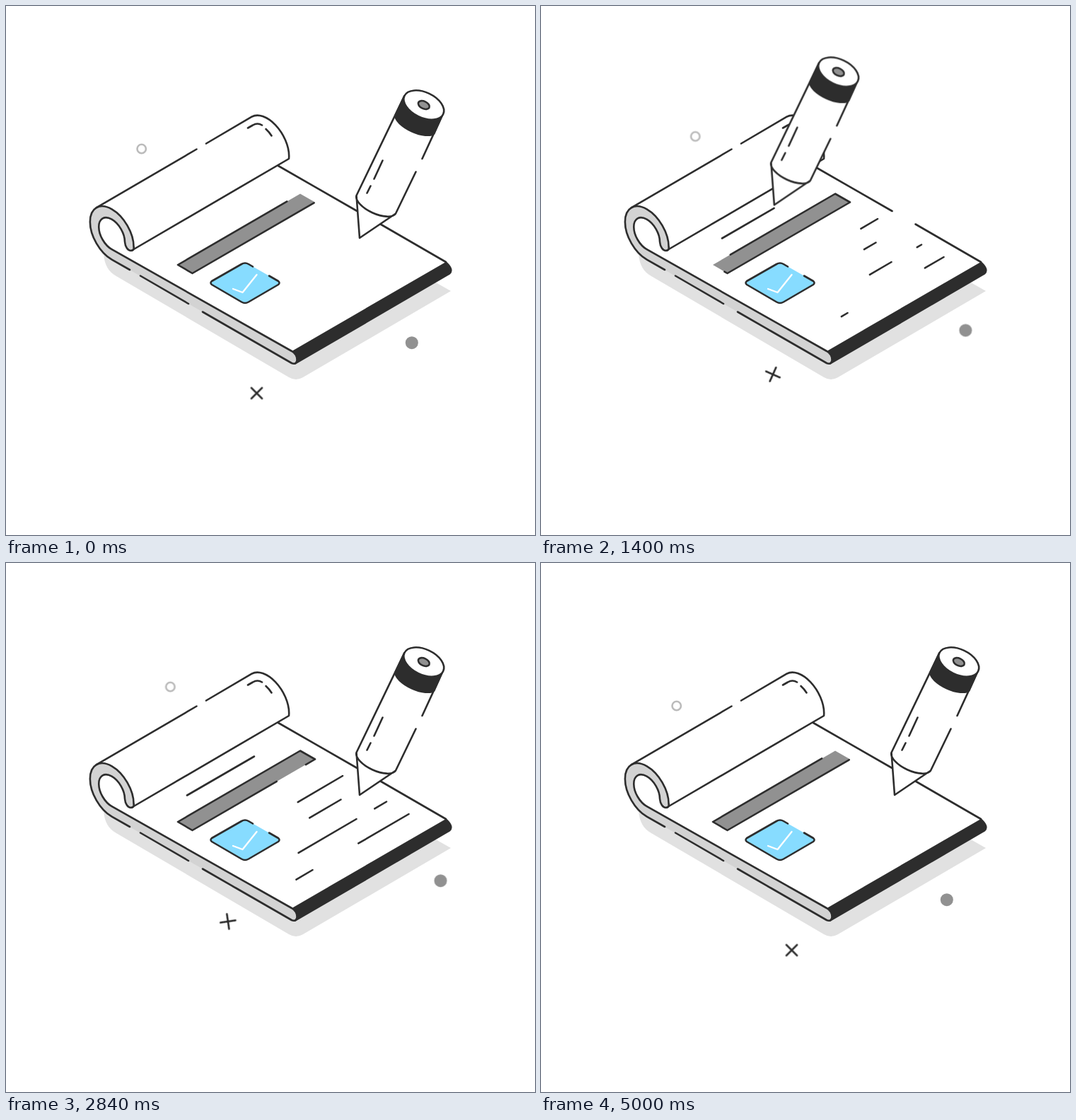
Write an HTML page without scripts that moves like this. It is 748 by 748 pixels and loops after 5040 ms.

```html
<!DOCTYPE html>
<html lang="en">
<head>
<meta charset="utf-8">
<title>Notepad and pencil</title>
<style>
  :root { --ink: #2d2d2d; --mid: #919191; --smooth: cubic-bezier(.333, 0, .667, 1); }
  html, body { margin: 0; width: 100%; height: 100%; overflow: hidden; background: #fff; }
  svg { display: block; width: 100vw; height: 100vh; }

  .line { fill: none; stroke: var(--ink); stroke-width: 2.6; stroke-linecap: round; stroke-linejoin: round; }
  .paper { fill: #fff; }
  .mid { fill: var(--mid); }
  .edge { fill: #d3d3d3; }
  .ink { fill: var(--ink); }

  .drift, .spin, .trim, .written, .gap, .px, .py { animation: 5040ms infinite var(--smooth); }

  /* floating marks */
  .drift { animation-name: drift; }
  .spin { animation-name: spin; }
  @keyframes drift {
    0%, 99.206%, 100% { transform: none; }
    48.413% { transform: translate(var(--dx), var(--dy)); }
  }
  @keyframes spin {
    0% { transform: rotate(0deg); }
    99.206%, 100% { transform: rotate(360deg); }
  }

  /* text lines: drawn and wiped three times */
  .trim, .written { stroke-dasharray: 100 101; }
  .trim { animation-name: trim; }
  @keyframes trim {
    0% { stroke-dashoffset: 100.5; }
    16.534% { stroke-dashoffset: 0; }
    33.069% { stroke-dashoffset: -100.5; }
    49.603% { stroke-dashoffset: -201; }
    66.138% { stroke-dashoffset: -301.5; }
    82.672% { stroke-dashoffset: -402; }
    99.206%, 100% { stroke-dashoffset: -502.5; }
  }

  /* the line under the pencil */
  .written { animation-name: written; animation-timing-function: linear; }
  @keyframes written {
    0%, 12.4% { stroke-dashoffset: 100.5; }
    32.242%, 79.365% { stroke-dashoffset: 0; }
    99.206%, 100% { stroke-dashoffset: -100.5; }
  }

  /* gap running twice around the bar */
  .gap { stroke-dasharray: 400.5 47.5; animation-name: gap; animation-timing-function: linear; }
  @keyframes gap {
    0% { stroke-dashoffset: 222.5; }
    99.206%, 100% { stroke-dashoffset: -673.5; }
  }

  /* pencil: hop left, write, hop back */
  .px { animation-name: px; }
  .py { animation-name: py; }
  @keyframes px {
    0% { transform: none; animation-timing-function: cubic-bezier(.45, 0, .45, 1); }
    12.4% { transform: translateX(-242px); animation-timing-function: linear; }
    32.242% { transform: translateX(-149.5px); animation-timing-function: cubic-bezier(.4, 0, .38, 1); }
    49.603%, 100% { transform: none; }
  }
  @keyframes py {
    0% { transform: none; }
    6.2% { transform: translateY(-106px); }
    12.4% { transform: translateY(-6px); animation-timing-function: linear; }
    32.242% { transform: translateY(-58.5px); }
    37.698% { transform: translateY(-106px); }
    49.603%, 100% { transform: none; }
  }
</style>
</head>
<body>
<svg viewBox="0 0 748 748">
  <!-- shadow and page -->
  <path fill="#e1e1e1" d="M138 350C139 366 145 376 156 382L400 525Q410 531 420 525L629 403L606 390L400 480Z"/>
  <path class="paper" d="M160 350L385 226L622 362L404 488Z"/>
  <path class="line" d="M385 226L496.500 290M529.500 308.500L622 362"/>
  <path class="line" style="fill:var(--ink)" d="M405 489L622.500 363C628 368 632 374 627 378.500L409 505.500Q413 497 405 489Z"/>

  <!-- curled sheet edge -->
  <path class="edge" d="M404 505L149.700 358.700A43.700 25.200 60 1 1 180.600 340.900C181 344 180 346 177 346C172 346 168.500 340 168 333.500A26 15 60 1 0 149.700 344.200L404 488C414 494 414 509 404 505Z"/>
  <path class="line" d="M175 373L149.700 358.700A43.700 25.200 60 1 1 180.600 340.900C181 344 180 346 177 346C172 346 168.500 340 168 333.500A26 15 60 1 0 149.700 344.200L404 488C414 494 414 509 404 505L278 432.500M190 381.500L258 421"/>

  <!-- roll -->
  <path class="line" d="M127.900 285.200L269.500 202.500M283 194.500L347.400 156.700A43.700 25.200 60 0 1 400.200 212.400L400 216L178 345.500M342 172.500L349 168.500C353 166 358 166 362 168.500M367.500 174Q372 178 375.500 183.500"/>

  <!-- bar -->
  <path class="mid" d="M243 366L416 265.500L437 277.500L263.500 378Z"/>
  <path class="line gap" pathLength="448" d="M243 366L416 265.500L437 277.500L263.500 378Z"/>

  <!-- checkbox -->
  <path fill="#87dcff" d="M291 389L333 365Q338 362 343 365L385 389Q388 391.500 385 394L343 418.500Q338 421.500 333 418.500L291 394Q288 391.500 291 389Z"/>
  <path class="line" d="M372 381.500L385 389Q388 391.500 385 394L343 418.500Q338 421.500 333 418.500L291 394Q288 391.500 291 389L333 365Q338 362 343 365L349 368.500"/>
  <path class="line" style="stroke:#fff;stroke-width:2.300" d="M321 400L334.500 405L354.500 380"/>

  <!-- text lines -->
  <g class="line">
    <path class="written" pathLength="100" d="M256 328.500L351 273.500"/>
    <path class="trim" pathLength="100" d="M376 359.500L476 301"/>
    <path class="trim" pathLength="100" d="M403.500 375.500L473.500 334.500"/>
    <path class="trim" pathLength="100" d="M366 437.500L495.500 362"/>
    <path class="trim" pathLength="100" d="M511.500 353L538 337.500"/>
    <path class="trim" pathLength="100" d="M457 420.500L569.500 355"/>
    <path class="trim" pathLength="100" d="M397 455.500L433.500 434"/>
  </g>

  <!-- floating marks -->
  <g class="drift" style="--dx:43.500px;--dy:-28.800px">
    <circle cx="191.700" cy="202" r="6.200" fill="none" stroke="#bbb" stroke-width="2.600"/>
    <circle class="mid" cx="573.800" cy="476.200" r="9"/>
  </g>
  <g class="drift" style="--dx:-43.500px;--dy:-43.500px">
    <g transform="translate(354.500 547.500)">
      <path class="line spin" d="M-7.500 -7.500L7.500 7.500M7.500 -7.500L-7.500 7.500"/>
    </g>
  </g>

  <!-- pencil -->
  <g class="px"><g class="py">
    <path class="paper" d="M563.400 127.100L495.500 268L500 328L551 293.500L617.600 152.900Z"/>
    <path class="paper" d="M495.500 268A30.600 13.500 24.700 0 0 551 293.500Z"/>
    <path class="line" d="M563.400 127.100L495.500 268A30.600 13.500 24.700 0 0 551 293.500L579.500 234.500M588.500 216L617.600 152.900M495.500 268L500 328L551 293.500M532.500 218.500L520.500 244.500M515.500 254.500L510.500 264.500"/>
    <path class="line" style="fill:var(--ink)" d="M563.400 127.100L550.500 154.500A30.600 12.500 24.700 0 0 605.500 180L617.600 152.900Z"/>
    <g transform="translate(590.800 140) rotate(25.400)">
      <ellipse class="line" style="fill:#fff" rx="30.300" ry="17.800"/>
      <ellipse class="line" style="fill:var(--mid)" rx="8.500" ry="5.200"/>
    </g>
  </g></g>
</svg>
</body>
</html>
```
